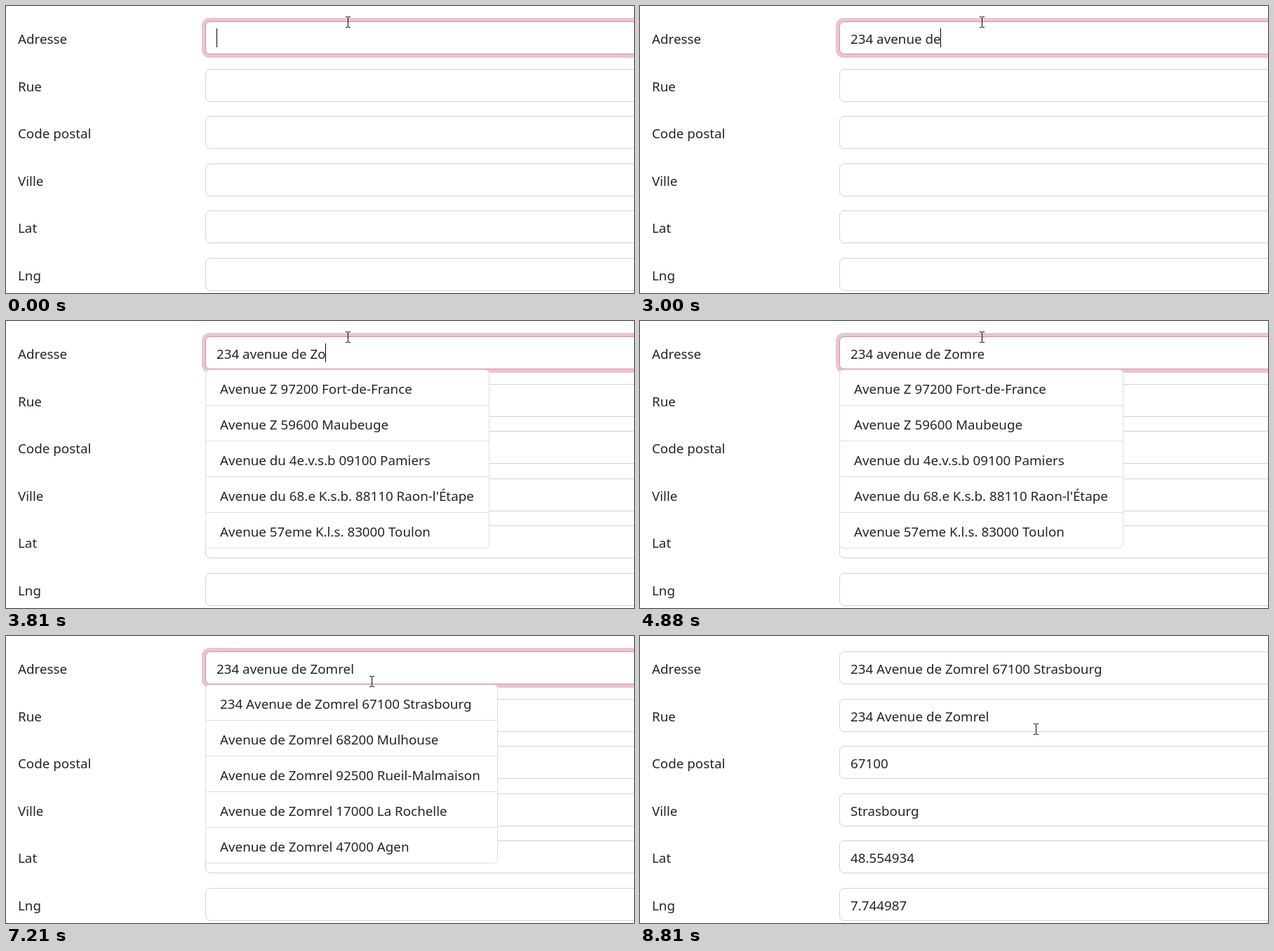
Animation of 895x410 px, one loop 8.88 s. Source, as an HTML page:

```html
<!DOCTYPE html>
<html lang="fr">
<head>
<meta charset="utf-8">
<title>Adresse</title>
<style>
  html, body { margin: 0; width: 100%; height: 100%; overflow: hidden; background: #fff; }
  svg { display: block; }
  text { font: 18.8px "Noto Sans", "Open Sans", sans-serif; fill: #212529; white-space: pre; }
</style>
</head>
<body>
<svg id="stage" width="895" height="410" viewBox="0 0 895 410"></svg>
<script>
const LOOP = 8880;
const FONT = '18.8px "Noto Sans", "Open Sans", sans-serif';
const BORDER = '#d0d1d8';
const TYPED = '234 avenue de Zomrel';
const LABELS = ['Adresse', 'Rue', 'Code postal', 'Ville', 'Lat', 'Lng'];
const RESULT = ['234 Avenue de Zomrel 67100 Strasbourg', '234 Avenue de Zomrel',
  '67100', 'Strasbourg', '48.554934', '7.744987'];
const ROW_Y = [22, 90, 157, 225, 292, 360];

// Moment at which each character of TYPED appears
const KEYS = [130, 460, 660, 1400, 1610, 1740, 1880, 1940, 2150, 2680,
  2740, 2870, 3000, 3070, 3680, 3810, 4010, 4140, 4680, 5550];
// Spans in which the caret is hidden
const CARET_OFF = [[990, 1510], [2150, 2680], [3210, 3680], [4280, 4680],
  [4880, 5420], [5950, 6480], [7010, 7550], [8020, LOOP]];
const BLUR = 8020, PICK = 8220, JUMP = 8810;

const LISTS = [
  { from: 3140, to: 3810, right: 649, items: [
    '234 Avenue Gombrevil 75012 Paris',
    '234 avenue Vrinée 72000 Le Mans',
    '234 Avenue Tarneul 49100 Angers',
    '234 avenue Lirvolade 72000 Le Mans',
    '234 Avenue Tarneul 33600 Pessac'] },
  { from: 3810, to: 4950, right: 689, items: [
    'Avenue Z 97200 Fort-de-France',
    'Avenue Z 59600 Maubeuge',
    'Avenue du 4e.v.s.b 09100 Pamiers',
    "Avenue du 68.e K.s.b. 88110 Raon-l'Étape",
    'Avenue 57eme K.l.s. 83000 Toulon'] },
  { from: 4950, to: PICK, right: 701, items: [
    '234 Avenue de Zomrel 67100 Strasbourg',
    'Avenue de Zomrel 68200 Mulhouse',
    'Avenue de Zomrel 92500 Rueil-Malmaison',
    'Avenue de Zomrel 17000 La Rochelle',
    'Avenue de Zomrel 47000 Agen'] }
];

const stage = document.getElementById('stage');

function add(tag, attrs, parent = stage) {
  const el = document.createElementNS('http://www.w3.org/2000/svg', tag);
  for (const k in attrs) el.setAttribute(k, attrs[k]);
  return parent.appendChild(el);
}

function addText(x, y, str, parent) {
  const el = add('text', { x, y }, parent);
  el.textContent = str;
  return el;
}

function show(el, on) {
  el.setAttribute('visibility', on ? 'visible' : 'hidden');
}

const ring = add('rect', { x: 279, y: 17, width: 640, height: 57, rx: 11, fill: '#e9c5d1' });
const boxes = ROW_Y.map(y => add('rect',
  { x: 284.5, y: y + .5, width: 640, height: 46, rx: 6.5, fill: '#fff', stroke: BORDER }));
LABELS.forEach((s, i) => addText(17, ROW_Y[i] + 32, s));
const values = ROW_Y.map(y => addText(300, y + 32, ''));
const caret = add('rect', { y: 32, width: 1, height: 27, fill: '#000' });

for (const list of LISTS) {
  const g = list.el = add('g', {});
  const width = list.right - 285;
  add('rect', { x: 284.5, y: 69.5, width, height: 255, rx: 6, fill: '#fff', stroke: '#dcdde1' }, g);
  list.items.forEach((s, i) => {
    addText(305, 104 + 51 * i, s, g);
    if (i) add('rect', { x: 285, y: 69 + 51 * i, width: width - 1, height: 1, fill: '#dcdde1' }, g);
  });
}

const beam = add('path', {
  d: 'M-3-8h3v1h1v-1h3v1h-3v14h3v1h-3v-1h-1v1h-3v-1h3v-14h-3z',
  fill: '#000', 'shape-rendering': 'crispEdges'
});
const click = add('circle', { cx: 552, cy: 105, r: 14.7, fill: '#ff0', 'fill-opacity': .58 });

const ctx = document.createElement('canvas').getContext('2d');

function textWidth(str) {
  ctx.font = FONT;
  return ctx.measureText(str).width;
}

function pointer(t) {
  if (t >= JUMP) return [564, 133];
  const step = t < 7010 ? 0 : Math.min(6, 1 + Math.floor((t - 7010) / 68));
  const p = step / 6, e = p * p * (3 - 2 * p);
  return [Math.round(487 + 67 * e), Math.round(23 + 83 * e)];
}

function draw(t) {
  const focus = t < BLUR, done = t >= PICK;
  const typed = TYPED.slice(0, KEYS.filter(k => k <= t).length);

  show(ring, focus);
  boxes[0].setAttribute('stroke', focus ? '#d58ea8' : BORDER);
  values.forEach((el, i) => {
    const s = done ? RESULT[i] : i ? '' : typed;
    if (el.textContent !== s) el.textContent = s;
  });

  caret.setAttribute('x', Math.floor(300 + textWidth(typed)));
  show(caret, !CARET_OFF.some(([a, b]) => t >= a && t < b));
  for (const list of LISTS) show(list.el, t >= list.from && t < list.to);

  beam.setAttribute('transform', `translate(${pointer(t)})`);
  show(click, !focus && !done);
}

const start = performance.now();

function tick() {
  draw((performance.now() - start) % LOOP);
  requestAnimationFrame(tick);
}
tick();
</script>
</body>
</html>
```
